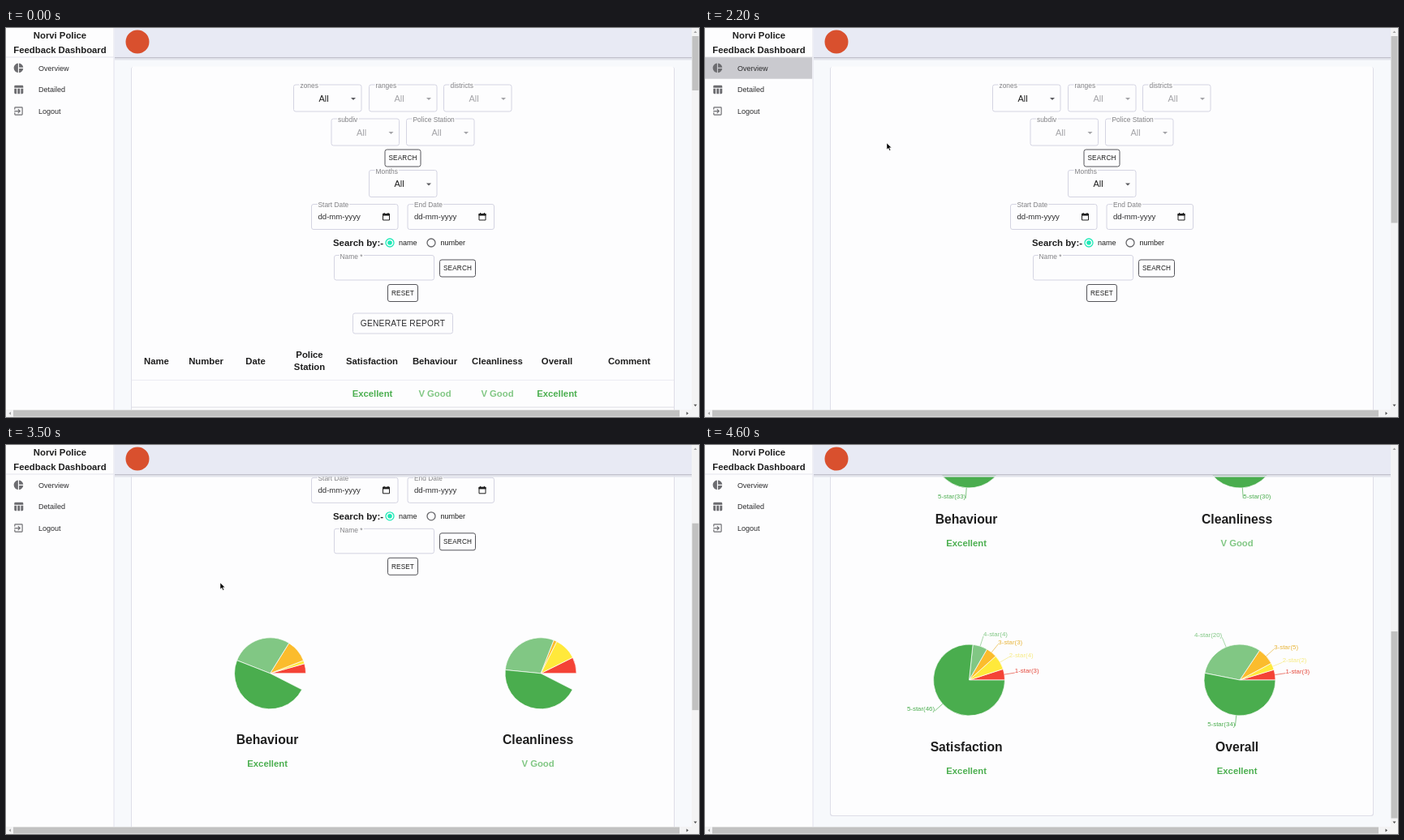
Recreate the animation shown at these times as an HTML page. Size 854 by 480 pixels, loop 5.5 s.

```html
<!DOCTYPE html>
<html lang="en">
<head>
<meta charset="utf-8">
<title>Feedback Dashboard</title>
<style>
html, body { margin: 0; width: 100%; height: 100%; overflow: hidden; background: #f7f9fc; }
svg { display: block; width: 854px; height: 480px; font-family: "Liberation Sans", Arial, sans-serif; }
.b { font-weight: bold; }
.lab { paint-order: stroke; stroke: #fdfdfe; stroke-width: 3px; }
</style>
</head>
<body>
<svg id="stage" viewBox="0 0 854 480"></svg>
<script>
const DARK = '#1e1e1e', MUTED = '#808084', PALE = '#a4a4a8', LINE = '#d4d4e2', PAPER = '#fdfdfe';
const STARS = ['#f44336', '#ffe93b', '#fbbc2d', '#81c784', '#4aad4e'];
const LABELS = ['#e5493c', '#f6ea80', '#e8b53a', '#81c784', '#4aad4e'];
const R = 44, LABEL_R = 57;

// x is the middle unless another anchor is given; y is the middle of the capitals
const text = (x, y, s, size, fill = DARK, anchor = 'middle', extra = '') =>
  `<text x="${x}" y="${y + size * .36}" font-size="${size}" fill="${fill}" text-anchor="${anchor}" ${extra}>${s}</text>`;
const bold = (x, y, s, size = 11.3, fill = DARK) => text(x, y, s, size, fill, 'middle', 'class="b"');
const rect = (x, y, w, h, fill, extra = '') =>
  `<rect x="${x}" y="${y}" width="${w}" height="${h}" fill="${fill}" ${extra}/>`;
const outline = (x, y, w, h, color) => rect(x, y, w, h, 'none', `rx="2.5" stroke="${color}"`);
const label = (x, y, s) => text(x, y, s, 8.4, MUTED, 'start', 'class="lab"');
const path = (d, fill, extra = '') => `<path d="${d}" fill="${fill}" ${extra}/>`;

function select(x, y, name, on) {
  const c = on ? DARK : PALE;
  return outline(x, y, 83.5, 33, LINE) + label(x + 8, y + 1, name) +
    text(x + 37, y + 17, 'All', 11, c) + path(`M${x + 70.5} ${y + 16}h6l-3 3z`, on ? '#5c5c60' : PALE);
}

function button(x, y, w, s) {
  return outline(x, y, w, 21, '#55555a') + text(x + w / 2, y + 10.5, s, 8.2, DARK, 'middle', 'letter-spacing=".15"');
}

function dateBox(x, name) {
  return outline(x, 217.5, 106.5, 31, LINE) + label(x + 8, 218, name) +
    text(x + 8, 233, 'dd-mm-yyyy', 9.6, '#2c2c2e', 'start') +
    path(`M${x + 88} 229.5h8v7.5h-8z`, 'none', `stroke="${DARK}"`) +
    rect(x + 87.5, 229, 9, 2.6, DARK) + rect(x + 89, 228, 1.2, 2, DARK) +
    rect(x + 93.8, 228, 1.2, 2, DARK);
}

const radio = (x, color, dot) =>
  `<circle cx="${x}" cy="265" r="5" fill="none" stroke="${color}" stroke-width="1.3"/>` +
  (dot ? `<circle cx="${x}" cy="265" r="2.8" fill="${color}"/>` : '');

const form = () =>
  select(354.5, 70, 'zones', true) + select(447.5, 70, 'ranges') + select(539.5, 70, 'districts') +
  select(401, 112, 'subdiv') + select(493.5, 112, 'Police Station') +
  select(447.5, 175.5, 'Months', true) + button(467, 150, 44, 'SEARCH') +
  dateBox(376.5, 'Start Date') + dateBox(495, 'End Date') +
  bold(434, 265, 'Search by:-', 11.4) +
  radio(473, '#1de9b6', true) + text(484, 265, 'name', 9, DARK, 'start') +
  radio(524, '#66666a') + text(535.5, 265, 'number', 9, DARK, 'start') +
  outline(404.5, 280.5, 123, 30.5, LINE) + label(411.5, 282, 'Name *') +
  button(534.5, 286, 44, 'SEARCH') + button(470.5, 316.5, 37, 'RESET');

const rating = s => s === 'Excellent' ? '#4caf50' : '#81c784';

function table() {
  const heads = [[185.5, 'Name'], [246.5, 'Number'], [307.5, 'Date'], [451, 'Satisfaction'],
    [528.5, 'Behaviour'], [605.5, 'Cleanliness'], [679, 'Overall'], [768, 'Comment']];
  const cells = [[451.5, 'Excellent'], [528.5, 'V Good'], [605.5, 'V Good'], [679, 'Excellent']];
  return outline(427.5, 352, 123, 25, LINE) +
    text(489, 364.5, 'GENERATE REPORT', 10.2, '#2c2c2e', 'middle', 'letter-spacing=".28"') +
    heads.map(([x, s]) => bold(x, 411, s)).join('') +
    bold(374, 403, 'Police') + bold(374, 418, 'Station') +
    cells.map(([x, s]) => bold(x, 451, s, 11.3, rating(s))).join('') +
    rect(155, 434, 668, 1, '#ececf2') + rect(155, 467.5, 668, 1, '#dedee6');
}

// counts run from one star to five
const charts = [
  { x: 325.5, y: 459, name: 'Behaviour', grade: 'Excellent', counts: [3, 1, 7, 19, 33] },
  { x: 659, y: 459, name: 'Cleanliness', grade: 'V Good', counts: [5, 7, 1, 20, 30] },
  { x: 325.5, y: 740, name: 'Satisfaction', grade: 'Excellent', counts: [3, 4, 3, 4, 46] },
  { x: 659, y: 740, name: 'Overall', grade: 'Excellent', counts: [3, 2, 5, 20, 34] }
];

const polar = (c, r, a) => [c.x + r * Math.cos(a), c.y - r * Math.sin(a)].map(v => v.toFixed(2));

function pie(c, grow, labels) {
  const total = c.counts.reduce((a, b) => a + b);
  let a = 0, out = '';
  c.counts.forEach((n, i) => {
    const sweep = n / total * grow * 2 * Math.PI, mid = a + sweep / 2, end = a + sweep;
    out += path(`M${c.x} ${c.y}L${polar(c, R, a)}A${R} ${R} 0 ${+(sweep > Math.PI)} 0 ${polar(c, R, end)}z`,
      STARS[i], 'stroke="#fff" stroke-width=".7"');
    if (labels) {
      const [x, y] = polar(c, LABEL_R, mid);
      out += path(`M${polar(c, R, mid)}L${x} ${y}`, 'none', `stroke="${LABELS[i]}" stroke-width=".7"`) +
        `<text x="${x}" y="${y}" font-size="7.9" fill="${LABELS[i]}" text-anchor="${x > c.x ? 'start' : 'end'}">${i + 1}-star(${n})</text>`;
    }
    a = end;
  });
  return out;
}

const captions = () => charts.map(c =>
  bold(c.x - 3.4, c.y + 82, c.name, 15.7) + bold(c.x - 3.4, c.y + 111.5, c.grade, 11.3, rating(c.grade))).join('');

const icons = [
  'M11 2v20c-5.1-.5-9-4.8-9-10s3.9-9.5 9-10zm2 0v9h9c-.5-4.7-4.2-8.5-9-9zm0 11v9c4.7-.5 8.5-4.2 9-9z',
  'M10 10h5v11h-5zM17 21h3q2 0 2-2v-9h-5zM20 3H5q-2 0-2 2v3h19V5q0-2-2-2zM3 19q0 2 2 2h3V10H3z',
  'M10 15.6L11.5 17l5-5-5-5L10 8.4 12.7 11H3v2h9.7zM19 3H5q-2 0-2 2v4h2V5h14v14H5v-4H3v4q0 2 2 2h14q2 0 2-2V5q0-2-2-2z'
];

const menu = () => ['Overview', 'Detailed', 'Logout'].map((s, i) => {
  const y = 49.4 + i * 26.6;
  return rect(0, y - 13.3, 132, 26.6, '#cacacf', `id="row${i}" opacity="0"`) +
    `<g transform="translate(8.5 ${y - 7}) scale(.58)">${path(icons[i], '#6c6c70')}</g>` +
    text(40, y, s, 9, '#2c2c2e', 'start');
}).join('');

const $ = id => document.getElementById(id);

$('stage').innerHTML =
  rect(0, 0, 854, 480, '#f7f9fc') +
  `<g id="page">${rect(154, 48, 670, 860, '#dedee8', 'rx="3"')}${rect(155, 47.5, 668, 859.5, PAPER, 'rx="3"')}
    ${form()}<g id="detail">${table()}</g><g id="overview">${captions()}<g id="pies"></g></g></g>` +
  rect(134, 36, 711, 1.5, '#c0c0cc') + rect(134, 37.5, 711, 2, '#e2e4ec') + rect(134, 0, 711, 36, '#e8eaf4') +
  '<circle cx="162" cy="17" r="14.5" fill="#d9502e"/>' +
  rect(0, 0, 133, 471, PAPER) + rect(132.5, 0, 1, 471, '#e2e2ec') + rect(0, 35.5, 133, 1, '#e6e6ee') +
  bold(66.5, 9.3, 'Norvi Police') + bold(66.5, 27, 'Feedback Dashboard') + menu() +
  rect(845, 0, 9, 471, '#f3f3f4') + rect(0, 471, 854, 9, '#f3f3f4') +
  rect(845.5, 10, 8, 67, '#c1c1c1', 'id="thumb"') + rect(9, 471.5, 821, 8, '#c1c1c1') +
  path('M847.5 6h4l-2-2.5zM6 473.5v4l-2.5-2z', '#a3a3a3') +
  path('M847.5 464.5h4l-2 2.5zM838.5 473.5v4l2.5-2z', '#505050') +
  `<g id="cursor">${path('M0 0v8l1.9-1.7 1.4 3 1.4-.6-1.4-2.9h2.6z', '#000', 'stroke="#fff" stroke-width=".5"')}</g>`;

// piecewise linear track: [time, value] pairs
function at(t, track) {
  if (t <= track[0][0]) return track[0][1];
  for (let i = 1; i < track.length; i++) {
    const [t0, v0] = track[i - 1], [t1, v1] = track[i];
    if (t <= t1) return v0 + (v1 - v0) * (t - t0) / (t1 - t0);
  }
  return track[track.length - 1][1];
}

// cubic-bezier(.25, .1, .25, 1)
function ease(p) {
  if (p <= 0 || p >= 1) return p <= 0 ? 0 : 1;
  const curve = (s, a, b) => 3 * a * s * (1 - s) ** 2 + 3 * b * s * s * (1 - s) + s ** 3;
  let lo = 0, hi = 1;
  for (let i = 0; i < 20; i++) {
    const m = (lo + hi) / 2;
    if (curve(m, .25, .25) < p) lo = m; else hi = m;
  }
  return curve(lo, .1, 1);
}

const SCROLL = [[3000, 0], [3200, 74], [3700, 246], [4100, 370], [4500, 450]];
const MOUSE_X = [[1900, 100], [2200, 224], [2500, 264], [3700, 264], [4100, 242], [4400, 120]];
const MOUSE_Y = [[1900, 60], [2200, 142], [2500, 170], [3700, 170], [4100, 171], [4400, 150]];
const HOVER = [
  [[1300, 0], [1500, .3], [1600, .3], [1900, 1], [2200, 1], [2800, 0]],
  [[1100, 0], [1200, .25], [1300, .3], [1500, 0]],
  [[1100, 0], [1200, .3], [1300, 0]]
];

function draw(t) {
  const overview = t >= 1800, y = at(t, SCROLL), x = at(t, MOUSE_X);
  $('page').setAttribute('transform', `translate(0 ${-y})`);
  $('detail').style.display = overview ? 'none' : '';
  $('overview').style.display = overview ? '' : 'none';
  $('thumb').setAttribute('y', 10 + y * .489);
  $('thumb').setAttribute('height', overview ? 230.5 : 67);
  $('pies').innerHTML = t > 2500 ? charts.map(c => pie(c, ease((t - 2500) / 1500), t >= 4000)).join('') : '';
  HOVER.forEach((track, i) => $('row' + i).setAttribute('opacity', at(t, track)));
  $('cursor').setAttribute('transform', `translate(${x} ${at(t, MOUSE_Y)})`);
  $('cursor').style.display = x > 133 ? '' : 'none';
}

const start = performance.now();
let last = -1;
function tick() {
  // the picture advances ten times a second
  const t = Math.floor((performance.now() - start) % 5500 / 100) * 100;
  if (t !== last) draw(last = t);
  requestAnimationFrame(tick);
}
tick();
</script>
</body>
</html>
```
